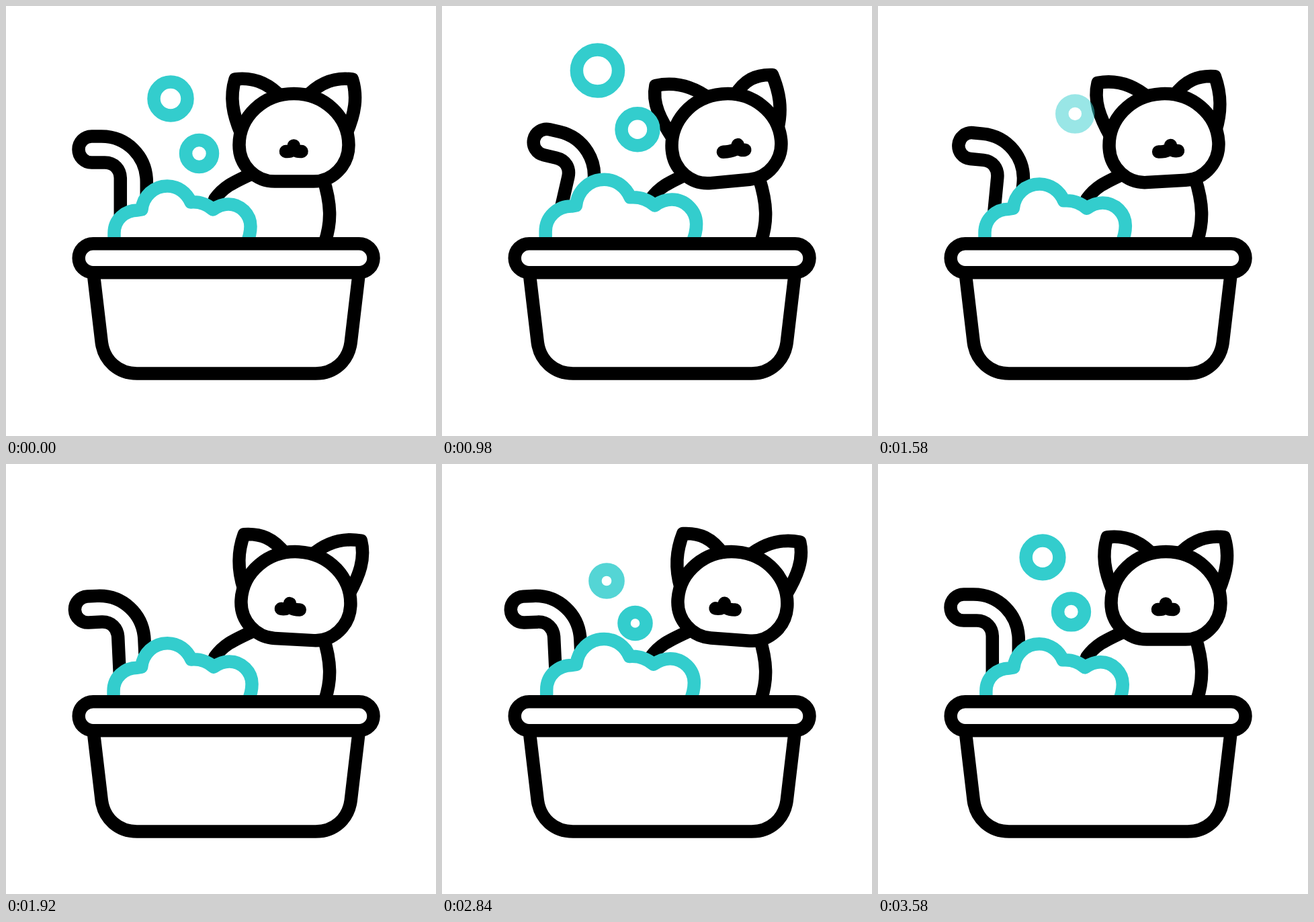
An HTML page for the animation above (3.6 s loop, 640 px wide and 640 px high).

```html
<!DOCTYPE html>
<html lang="en">
<head>
<meta charset="utf-8">
<title>Cat bath</title>
<style>
  html, body { margin: 0; width: 100%; height: 100%; overflow: hidden; background: #fff; }
  svg { display: block; width: 100vw; height: 100vh; }
  .line { fill: #fff; stroke: #000; stroke-width: 19.5; stroke-linecap: round; stroke-linejoin: round; }
  .open { fill: none; }
  .suds { stroke: #33cdcd; }
  .ring { fill: none; }
</style>
</head>
<body>
<svg viewBox="0 0 640 640">
  <path id="tail" class="line" d="M170.300 345V257C170.300 243 161 233 147 233H127.500A19.500 19.500 0 0 1 127.500 194H142C180 194 209.300 224 209.300 262V345"/>
  <path class="line open" d="M385 240.500C343 261 327 265 311 287L304 307"/>
  <path class="line open" d="M471.500 255C484.500 295 484.500 322 474.500 352"/>
  <g id="head">
    <path id="earL" class="line"/>
    <path id="earR" class="line" transform="matrix(-1 0 0 1 856.5 0)"/>
    <path class="line" d="M347 207C347 165 383 130.500 428.500 130.500C474 130.500 510 165 510 207C510 237 486 261 458 261H400C371 261 347 237 347 207Z"/>
    <path id="nose" class="line open"/>
  </g>
  <circle id="big" class="line suds ring"/>
  <circle id="small" class="line suds ring"/>
  <path id="foam" class="line suds" d="M161 354V338C161 318 177 304 196 304L202 303C204 283 220 268 240 268C256 268 269 278 275 292C288 291 299 295 308 303C315 298 322 295 331 295C349 295 364 310 364 328C364 337 362 345 358 354"/>
  <path class="line" d="M130.400 400L142.300 501C146 528 167 547 195 547H461C489 547 509.500 528 513.200 501L525.100 400"/>
  <rect class="line" x="108.200" y="353.700" width="438.800" height="43" rx="21.500"/>
</svg>
<script>
const LOOP = 3600, START = 60;
const $ = id => document.getElementById(id);
const clamp = x => Math.min(1, Math.max(0, x));
const linear = x => x;
const smooth = x => x * x * (3 - 2 * x);

// keys: [time, value] pairs in order
function track(keys, t, ease) {
  let [t0, v0] = keys[0];
  for (const [t1, v1] of keys) {
    if (t < t1) return v0 + (v1 - v0) * ease(clamp((t - t0) / (t1 - t0)));
    t0 = t1;
    v0 = v1;
  }
  return v0;
}

const TAIL = [[0, 0], [START, 0], [680, 12.9], [1095, 12.9], [2275, -7], [2556, -7], [3056, 0]];
const TURN = [[0, 0], [START, 0], [700, -1], [1330, -1], [2200, 1], [2625, 1], [3205, 0]];
const FOAM = [[0, 0], [START, 0], [1000, 0.108], [1820, 0], [2580, 0.11], [LOOP, 0]];

// speeds are px per ms; "rise" and "grow" hold the speed after and before the loop point
const BUBBLES = [
  { el: $("big"), x: 245, y: 138, r: 25, drift: -0.0147, rise: [0.0456, 0.0474], grow: [0.0066, 0.0074], out: 1290, into: 2590 },
  { el: $("small"), x: 287.5, y: 219.5, r: 20, drift: 0.0038, rise: [0.0388, 0.023], grow: [0.0043, 0.0046], out: 1445, into: 2480 }
];

function drawBubble(b, t) {
  const late = t > 2100 ? 1 : 0;
  const dt = late ? t - LOOP : Math.max(0, t - START);
  const alpha = late ? clamp((t - b.into) / 300) : 1 - clamp((t - b.out) / 270);
  b.el.setAttribute("cx", b.x + (late ? 0 : b.drift * dt));
  b.el.setAttribute("cy", b.y - b.rise[late] * dt);
  b.el.setAttribute("r", Math.max(1, b.r + b.grow[late] * dt - 14 * (1 - alpha)));
  b.el.setAttribute("opacity", alpha);
}

// the tip leans by e while the base stays
function earPath(e) {
  return `M350 190C${337 + e * 0.3} 160 ${333 + e} 135 ${341 + e} 109` +
    `C${365 + e} 106 ${388 + e / 2} 112 410 136`;
}

function nosePath(turn) {
  const q = -turn, y = 216.5;
  const left = 416.5 + q * (q > 0 ? 6 : 18.5);
  const mid = 428.3 + q * 17;
  const right = 440 + q * (q > 0 ? 15 : 10);
  return `M${left} ${y}Q${mid} ${y + 1} ${mid} ${y - 8.5}Q${mid} ${y + 1} ${right} ${y}`;
}

function draw(t) {
  $("tail").setAttribute("transform", `rotate(${track(TAIL, t, smooth)} 189 333)`);

  const turn = track(TURN, t, smooth);
  $("head").setAttribute("transform", `rotate(${turn * (turn < 0 ? 5.3 : 6)} 428 261)`);
  $("earL").setAttribute("d", earPath(9.5 * turn));
  $("earR").setAttribute("d", earPath(-9.5 * turn));
  $("nose").setAttribute("d", nosePath(turn));

  BUBBLES.forEach(b => drawBubble(b, t));

  // the foam swells while its line keeps the same weight
  const k = 1 + track(FOAM, t, linear);
  $("foam").setAttribute("transform", `translate(226 360) scale(${k}) translate(-226 -360)`);
  $("foam").style.strokeWidth = 19.5 / k;
}

const begin = performance.now();
function frame() {
  draw((performance.now() - begin) % LOOP);
  requestAnimationFrame(frame);
}
draw(0);
requestAnimationFrame(frame);
</script>
</body>
</html>
```
